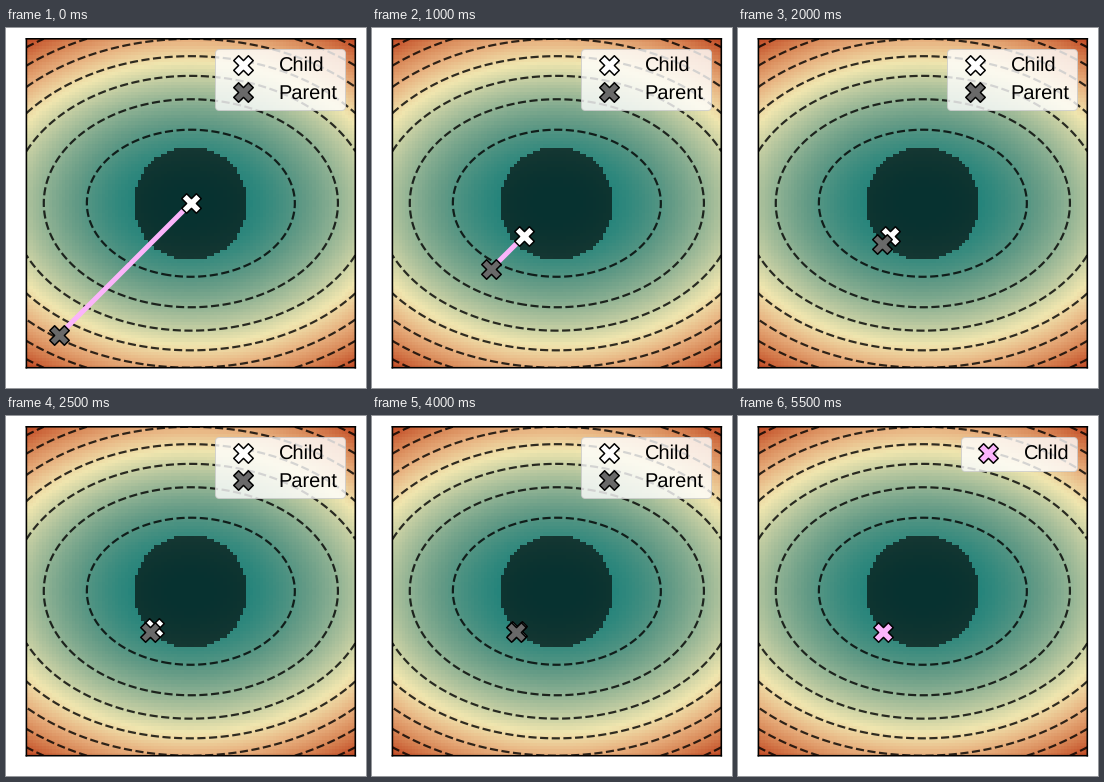
Animation of 360x360 px, one loop 6 s. Source, as a matplotlib script:

```python
import numpy as np
import matplotlib.pyplot as plt
from matplotlib.animation import FuncAnimation
from matplotlib.colors import LinearSegmentedColormap

STAGE, DPI = 360, 72
STEPS = 12
RADIUS_SQ = 3
PINK, GRAY = "#fbb4fb", "#696969"

plt.rcParams["font.family"] = "Liberation Sans"
plt.rcParams["font.size"] = 20
plt.rcParams["text.hinting"] = "none"

cmap = LinearSegmentedColormap.from_list("earth", [
    "#127d78", "#649b86", "#acc19c", "#f0e6af", "#e8b280", "#d78252", "#c34e28"])


def bisect(steps):
    """Bracket the feasible boundary along the diagonal."""
    parent, child = -4.0, 0.0
    for _ in range(steps):
        middle = (parent + child) / 2
        if 2 * middle**2 <= RADIUS_SQ:
            child = middle
        else:
            parent = middle
    return parent, child


fig = plt.figure(figsize=(STAGE / DPI, STAGE / DPI), dpi=DPI, facecolor="white")
side = 328.9 / STAGE
ax = fig.add_axes([20.4 / STAGE, 20.3 / STAGE, side, side])
ax.set(xticks=[], yticks=[])
for spine in ax.spines.values():
    spine.set(linewidth=1.6, snap=False)

axis = np.linspace(-5, 5, 100)
x, y = np.meshgrid(axis, axis)
cost = x**2 + 2 * y**2
extent = (-5, 5, -5, 5)
ax.imshow(cost, cmap=cmap, extent=extent, origin="lower", interpolation="nearest")

shade = np.zeros(cost.shape + (4,))
shade[..., 3] = 0.6 * (x**2 + y**2 <= RADIUS_SQ)
ax.imshow(shade, extent=extent, origin="lower", interpolation="nearest")
ax.contour(x, y, cost, levels=range(10, 80, 10), colors="black", alpha=0.8,
           linewidths=2.2, linestyles="dashed")
ax.set(xlim=(-5, 5), ylim=(-5, 5))


def cross(color, label, zorder):
    return ax.scatter([0], [0], s=19.5**2, marker="X", color=color, label=label,
                      edgecolors="black", linewidths=1.5, zorder=zorder)


link, = ax.plot([], [], color=PINK, lw=5, zorder=3)
child_mark = cross("white", "Child", 4)
parent_mark = cross(GRAY, "Parent", 4.5)


def update(step):
    done = step == STEPS - 1
    parent, child = bisect(step)
    child_mark.set_offsets([[child, child]])
    parent_mark.set_offsets([[parent, parent]])
    link.set_data([parent, child], [parent, child])
    child_mark.set_facecolor(PINK if done else "white")
    parent_mark.set_visible(not done)
    link.set_visible(not done)
    marks = [child_mark] if done else [child_mark, parent_mark]
    ax.legend(handles=marks, loc="upper right", borderpad=0.38,
              labelspacing=0.44, scatteryoffsets=[0.42])
    return link, child_mark, parent_mark


anim = FuncAnimation(fig, update, frames=STEPS, interval=500, repeat=True,
                     repeat_delay=0, blit=False)
plt.show()
```
